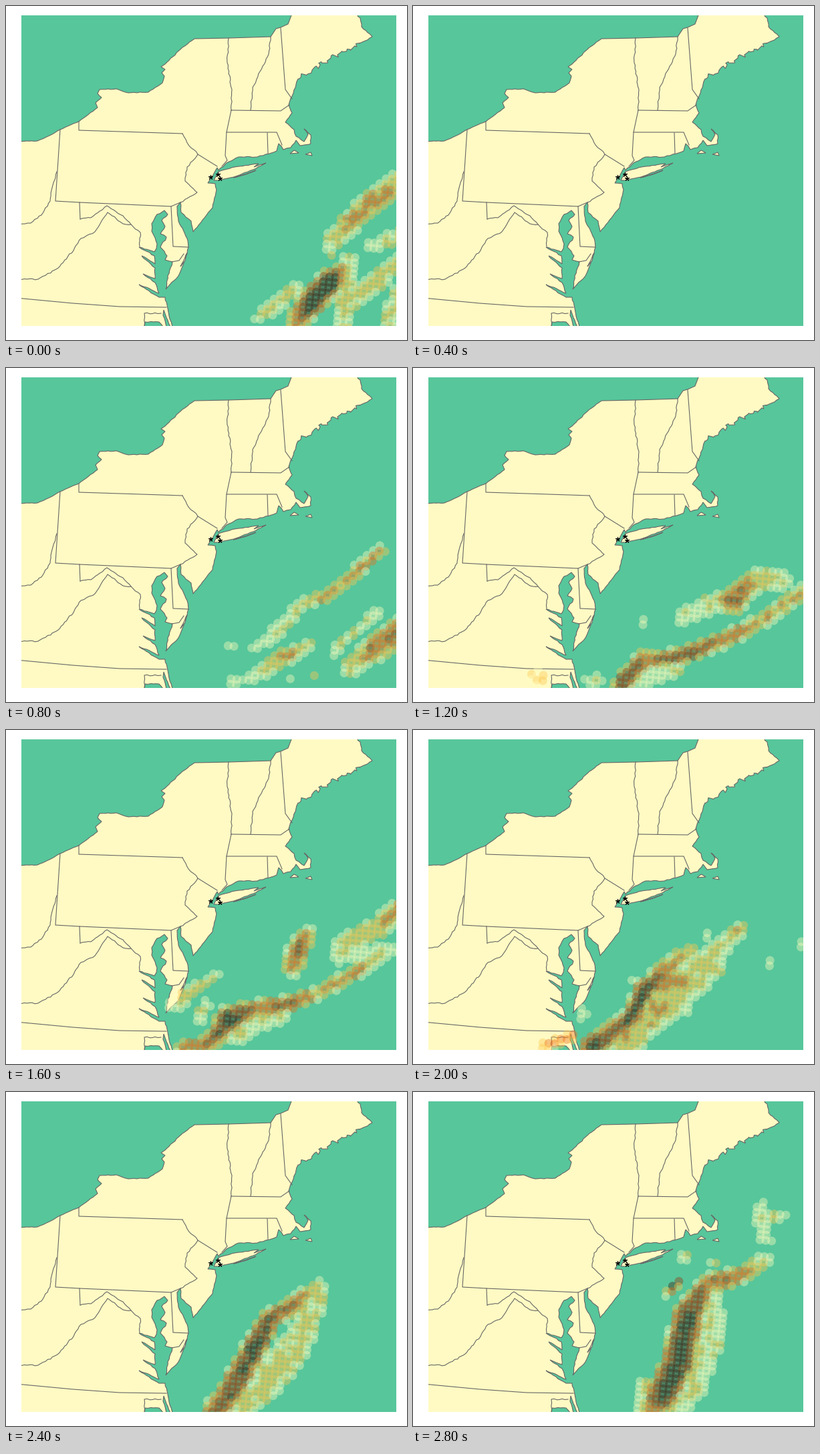
Animation, 600 px wide and 500 px high, one loop 3.2 s. Source, as a matplotlib script:

```python
import numpy as np
import matplotlib.pyplot as plt
from matplotlib.animation import FuncAnimation
from matplotlib.patches import Polygon

W, H, DPI = 600, 500, 100
PX = 72 / DPI
SEA, LAND, EDGE = "#57c69b", "#fffac3", "#666666"
LEFT, TOP, RIGHT, BOTTOM = 23, 14, 584, 479
RAIN = np.array([(255, 255, 190), (254, 200, 80), (236, 112, 25),
                 (153, 55, 10), (60, 26, 12)]) / 255
ALPHA = 0.4

rng = np.random.default_rng(4)


def pts(*xy):
    return np.array(xy, float).reshape(-1, 2)


def rough(p, amp=0.7, step=4):
    """Break each segment into short pieces with a little jitter."""
    out = [p[0]]
    for a, b in zip(p[:-1], p[1:]):
        n = max(1, int(np.hypot(*(b - a)) / step))
        for k in range(1, n):
            out.append(a + (b - a) * k / n + rng.uniform(-amp, amp, 2))
        out.append(b)
    return np.array(out)


def inlets(*spans):
    """Shore with narrow tapering rivers, each given as mouth and head."""
    shore = []
    for mx, my, hx, hy in spans:
        shore += [(mx, my + 3), (hx, hy), (mx, my - 3)]
    return np.array(shore, float)


# ---- map -------------------------------------------------------------
crest = pts(427, 8, 427, 14, 422, 27, 411, 32, 404, 34, 396, 46, 333, 48,
            282, 49)
lakes = pts(282, 49, 264, 62, 238, 87, 232, 91, 238, 95, 233, 100, 237, 105,
            234, 115, 213, 129, 183, 130, 165, 124, 140, 125, 137, 131,
            143, 137, 134, 145, 137, 152, 109, 173, 81, 185, 65, 194,
            47, 202, 15, 203)
corner = pts(15, 203, 15, 490, 253, 490)
outer_banks = pts(253, 490, 244, 464, 238, 436)
west_shore = inlets((229, 433, 199, 417), (223, 411, 205, 401),
                    (223, 389, 203, 374), (222, 371, 199, 361))
bay = pts(225, 363, 226, 356, 218, 337, 218, 326, 226, 312, 237, 306,
          242, 312, 233, 321, 238, 330, 231, 341, 240, 346, 231, 361,
          241, 374, 238, 380, 249, 383, 242, 404, 239, 424)
ocean = pts(239, 424, 258, 404, 266, 385, 273, 361, 271, 348, 258, 322,
            256, 300, 261, 294, 262, 309, 277, 322, 280, 338, 297, 317,
            309, 302, 315, 275, 313, 266, 302, 265, 316, 242)
sound = pts(316, 242, 318, 246, 330, 235, 348, 226, 376, 226, 405, 217,
            408, 206, 415, 215, 426, 212, 434, 201, 440, 209, 456, 206,
            456, 193, 446, 184, 452, 192, 446, 203, 434, 195, 431, 185,
            418, 174)
gulf = pts(418, 174, 428, 160, 423, 148, 428, 135, 437, 109)
coves = pts(437, 109, 458, 96, 486, 78, 515, 65, 533, 54)
north_east = pts(533, 54, 548, 46, 532, 31, 530, 18, 522, 8)

islands = [
    pts(311, 261, 318, 248, 342, 241, 378, 236, 371, 241, 389, 235, 370, 245,
        341, 256, 318, 261),
    pts(340, 257, 356, 253, 374, 246, 357, 252),
    pts(425, 221, 431, 216, 438, 220),
    pts(448, 222, 456, 219, 458, 224),
    pts(261, 390, 271, 370, 268, 381),
]
lagoons = [
    pts(207, 484, 208, 473, 229, 473, 240, 484),
    pts(236, 455, 247, 482, 241, 482, 235, 463),
]
rivers = [
    pts(396, 46, 393, 72, 380, 98, 369, 122, 366, 156),
    pts(333, 48, 331, 85, 338, 125, 337, 156),
    pts(264, 191, 273, 208, 287, 222, 271, 241, 268, 262, 286, 279, 261, 294),
    pts(76, 248, 68, 276, 66, 292, 53, 313, 37, 325, 15, 328),
    pts(111, 319, 127, 317, 151, 299, 175, 314, 187, 327, 201, 339, 200, 360),
    pts(187, 327, 175, 326, 152, 309, 133, 338, 112, 348, 101, 366, 77, 393,
        48, 409, 15, 409),
    pts(207, 479, 207, 460, 232, 460),
]
borders = [
    pts(337, 156, 330, 189, 328, 224, 331, 231, 323, 240),
    pts(337, 156, 411, 157, 424, 148),
    pts(411, 33, 418, 125, 428, 139),
    pts(330, 189, 405, 189, 413, 208),
    pts(391, 190, 392, 221),
    pts(109, 173, 109, 186, 264, 191),
    pts(287, 222, 316, 240),
    pts(81, 185, 74, 292, 110, 294, 247, 300, 261, 294),
    pts(110, 294, 111, 319),
    pts(247, 300, 250, 360, 273, 361),
    pts(248, 383, 259, 381, 266, 371),
    pts(15, 437, 100, 445, 170, 450, 240, 451),
]

# ---- rain ------------------------------------------------------------
# Each storm is a spine of key points: x, y, half width, peak strength.
dawn = [
    (490, 350, 16, 2, 545, 295, 18, 3.1, 590, 265, 18, 2.6),
    (435, 474, 17, 3.2, 455, 445, 22, 5.4, 487, 412, 20, 5.4, 503, 395, 12, 3),
    (545, 360, 9, 1.3, 588, 344, 12, 1.8),
    (375, 468, 6, 1.2, 400, 452, 13, 2, 432, 420, 9, 1.4),
    (515, 382, 13, 1.6, 505, 475, 14, 1.6),
    (520, 438, 16, 2.3, 588, 382, 14, 1.6),
    (572, 474, 14, 1.5, 588, 430, 14, 1.5),
    (484, 368, 7, 1.6),
]
chain = [
    (400, 400, 10, 1.4, 445, 352, 9, 1.8, 480, 342, 11, 3, 530, 300, 10, 2.6,
     562, 272, 8, 2.8),
    (510, 452, 12, 1.4, 555, 417, 22, 3.3, 590, 395, 22, 3.3),
    (490, 425, 7, 1.3, 525, 392, 7, 1.3, 558, 366, 9, 1.3),
    (380, 455, 10, 1.3, 418, 433, 12, 2.9, 457, 413, 8, 1.4),
    (340, 470, 6, 1.2, 392, 460, 6, 1.2),
    (370, 418, 7, 1.3, 405, 405, 8, 1.3),
    (428, 467, 6, 1.2), (460, 460, 7, 1.2), (336, 416, 6, 1.2),
]
front = [
    (405, 372, 12, 1.5, 455, 350, 14, 1.7, 478, 350, 22, 3.6,
     510, 318, 17, 2.4, 550, 318, 16, 1.4),
    (312, 474, 15, 4.6, 345, 438, 15, 3.5, 400, 432, 13, 4, 445, 415, 13, 3.7,
     500, 392, 12, 2.7, 588, 333, 12, 2.2),
    (345, 465, 14, 1.3, 395, 448, 14, 1.4),
    (255, 466, 7, 1.2, 278, 468, 9, 2),
    (345, 383, 8, 1.3), (187, 463, 14, 2),
]
split = [
    (430, 355, 15, 3, 437, 330, 17, 3.9, 452, 305, 13, 2.6),
    (265, 478, 13, 3, 305, 470, 14, 3.2, 335, 432, 21, 5.2, 375, 418, 14, 3.2,
     422, 410, 13, 4, 470, 393, 11, 2.2, 515, 368, 11, 3.2, 555, 342, 9, 2),
    (505, 318, 15, 1.6, 550, 300, 15, 2.2, 588, 270, 16, 3.4),
    (500, 338, 13, 1.4, 580, 330, 10, 1.2),
    (345, 460, 14, 1.4, 375, 430, 20, 1.4, 410, 430, 12, 1.4),
    (318, 366, 6, 1.2, 275, 394, 10, 2.4, 250, 414, 10, 1.3),
    (290, 430, 12, 1.4, 300, 410, 8, 1.3),
]
surge = [
    (268, 475, 19, 5.2, 295, 455, 16, 4, 328, 430, 16, 4.6, 345, 392, 16, 5,
     372, 365, 15, 3.4, 415, 330, 11, 2.6),
    (320, 462, 26, 2.4, 380, 405, 28, 2.4, 440, 355, 24, 1.8,
     465, 320, 14, 1.8, 492, 297, 9, 2.2),
    (365, 382, 16, 3, 402, 376, 16, 3),
    (200, 473, 9, 3, 238, 458, 8, 3.2),
    (334, 376, 7, 1.2), (410, 422, 8, 1.2), (440, 308, 7, 1.2),
    (534, 352, 8, 1.2), (581, 321, 6, 1.2), (254, 425, 9, 1.2),
]
column = [
    (360, 478, 20, 3, 370, 462, 25, 4.9, 396, 410, 27, 5.3, 413, 335, 25, 5,
     440, 288, 16, 3.4, 470, 281, 15, 4, 500, 270, 13, 3, 524, 252, 12, 1.6),
    (390, 476, 20, 1.5, 415, 440, 24, 1.6, 440, 370, 24, 1.6,
     447, 318, 18, 1.4),
    (343, 476, 11, 1.4, 345, 440, 11, 1.4),
    (521, 214, 9, 1.5, 521, 172, 9, 1.5),
    (525, 188, 11, 2, 552, 186, 8, 1.2),
    (379, 304, 6, 1.3, 389, 292, 6, 4.8, 399, 284, 5, 4),
    (405, 247, 9, 1.2), (452, 256, 8, 1.8), (533, 222, 6, 1.2),
]

# Slightly tilted grid of dots.
i, j = np.meshgrid(np.arange(-45, 30), np.arange(-40, 30))
grid = np.stack([378 + 8.8 * i - 0.75 * j, 306 + 0.82 * i + 8.08 * j], -1)
grid = grid.reshape(-1, 2)


def resample(storm, n=6):
    keys = np.reshape(storm, (-1, 4))
    at = np.linspace(0, len(keys) - 1, n)
    return np.stack([np.interp(at, range(len(keys)), c) for c in keys.T], 1)


def blend(a, b):
    """Halfway stage between two sets of storms."""
    return [(resample(p) + resample(q)).ravel() / 2 for p, q in zip(a, b)]


def strength(storm):
    keys = np.reshape(storm, (-1, 4)).astype(float)
    if len(keys) == 1:
        keys = np.vstack([keys, keys + (0.1, 0, 0, 0)])
    best = np.zeros(len(grid))
    for a, b in zip(keys[:-1], keys[1:]):
        d = b - a
        t = np.clip((grid - a[:2]) @ d[:2] / (d[:2] @ d[:2]), 0, 1)
        x, y, width, peak = (a + t[:, None] * d).T
        r = np.hypot(grid[:, 0] - x, grid[:, 1] - y) / width
        best = np.maximum(best, (r < 1) * (1 + (peak - 1) * (1 - r ** 2)))
    return best


def levels(storms):
    total = np.max([strength(s) for s in storms], axis=0)
    noise = rng.normal(0, 0.25, len(grid))
    return np.where(total > 0, np.clip(np.rint(total + noise), 1, 5), 0).astype(int)


stages = [dawn, blend(dawn, chain), chain, front, split, surge,
          blend(surge[:2], column), column]
rain = [levels(s) for s in stages]

# ---- drawing ---------------------------------------------------------
fig = plt.figure(figsize=(W / DPI, H / DPI), dpi=DPI, facecolor="white")
ax = fig.add_axes([LEFT / W, 1 - BOTTOM / H, (RIGHT - LEFT) / W,
                   (BOTTOM - TOP) / H])
ax.set(xlim=(LEFT, RIGHT), ylim=(BOTTOM, TOP), facecolor=SEA, xticks=[],
       yticks=[])
ax.spines[:].set_visible(False)


def area(p, color=LAND):
    ax.add_patch(Polygon(p, fc=color, ec=EDGE, lw=1.1 * PX))


area(np.vstack([
    crest, rough(lakes, 0.5), corner, rough(outer_banks), rough(west_shore),
    rough(bay, 0.9), rough(ocean, 0.6), rough(sound, 0.7), rough(gulf),
    rough(coves, 3.2, 3), rough(north_east, 0.9)]))
for p in islands:
    area(rough(p, 0.4))
for p in lagoons:
    area(rough(p), SEA)
for p in [rough(r, 0.9) for r in rivers] + borders:
    ax.plot(*p.T, color=EDGE, lw=1.1 * PX)

ax.plot([306, 317, 320], [256, 251.5, 257.5], ls="", marker=(5, 2, 0),
        ms=7 * PX, mec="black", mew=1.1 * PX, zorder=4)
dots = ax.scatter([], [], s=(13 * PX) ** 2, linewidths=0, zorder=3)


def draw(n):
    on = rain[n] > 0
    dots.set_offsets(grid[on])
    dots.set_facecolors([(*RAIN[k - 1], ALPHA) for k in rain[n][on]])
    return [dots]


anim = FuncAnimation(fig, draw, frames=len(rain), interval=400, repeat=True,
                     repeat_delay=0)
plt.show()
```
